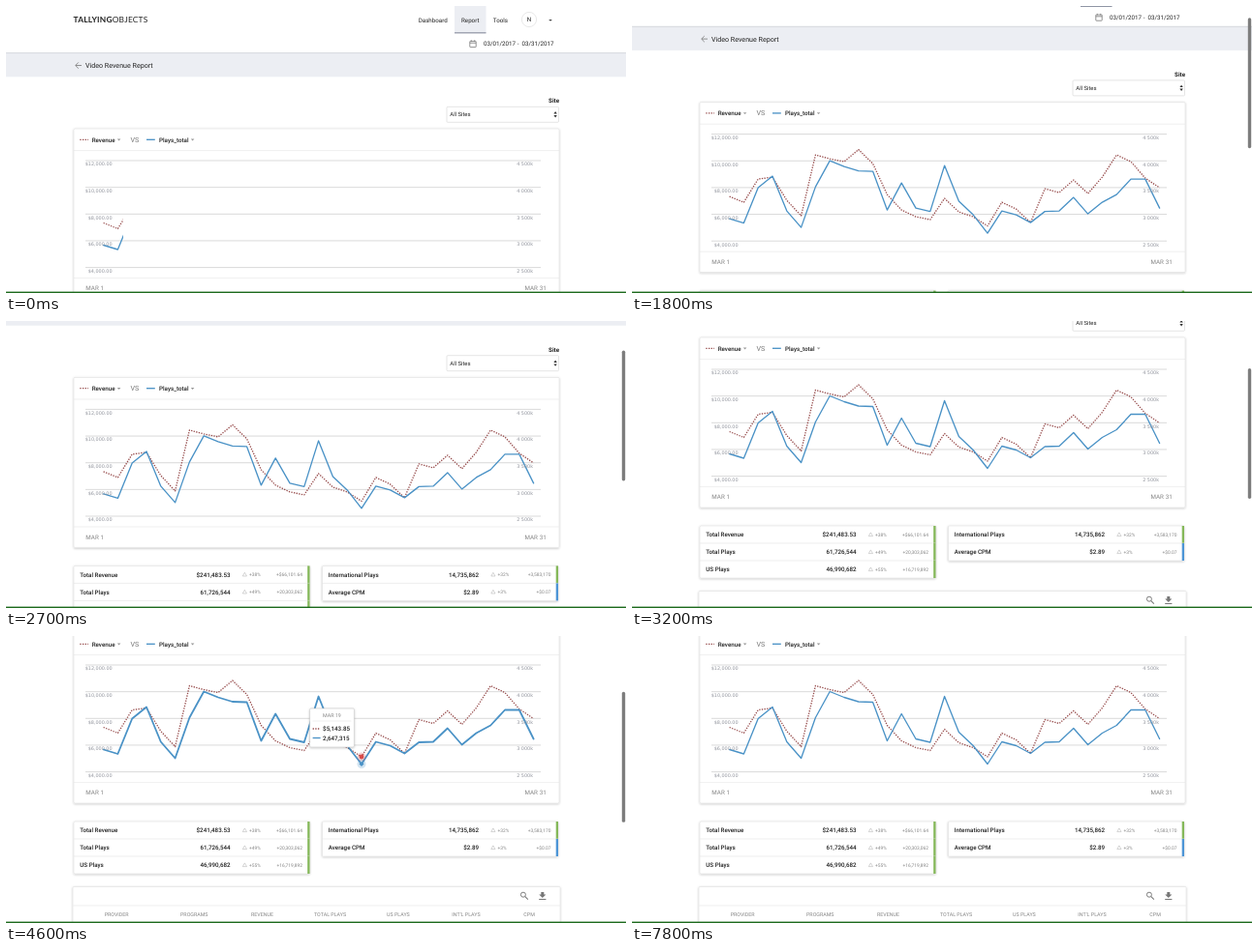
Write an HTML page that moves like this. It is 640 px wide and 297 px high and loops after 8 s.

```html
<!DOCTYPE html>
<html lang="en">
<head>
<meta charset="utf-8">
<title>Video Revenue Report</title>
<style>
  html, body { margin: 0; width: 100%; height: 100%; overflow: hidden; background: #fff; }
  svg { display: block; width: 100%; height: 100%; }
  text { font-family: Roboto, sans-serif; text-rendering: geometricPrecision; white-space: pre; }
  .axis { font-family: "DejaVu Sans", sans-serif; }
  .logo { font-family: Lato, sans-serif; }
</style>
</head>
<body>
<svg id="stage" viewBox="0 0 640 297" xmlns="http://www.w3.org/2000/svg"></svg>
<script>
const LOOP = 8000, STEP = 100;
const PLOT_TOP = 160, GRID_GAP = 27.65, FIRST_X = 100.6, DAY_W = 14.8;
const RED = '#964b4b', BLUE = '#4a92c6', INK = '#222', GREY = '#858585';
const GREEN_BAR = '#85b85a', BLUE_BAR = '#4d95d6';

// Heights of the daily values below the top grid line.
const revenue = [64.5, 70.5, 46.5, 44.5, 68.5, 84.5, 21.5, 25.5, 28.5, 16, 30.5, 62.5, 78.5, 85.5, 88.5, 66.5,
  80.5, 85.5, 95, 70.5, 77.5, 91.5, 56.5, 60.5, 47.5, 61.5, 44.5, 21.5, 28.5, 45.5, 55.5];
const plays = [87.5, 92, 55.5, 43.5, 79.5, 96.5, 54.5, 27.5, 33.5, 38, 38.5, 78.5, 50.5, 76.5, 80, 32.5,
  69.5, 83.5, 102.5, 79.5, 83.5, 91.5, 80, 79.5, 65.5, 82.5, 70.5, 62.5, 46.5, 46.5, 76.5];

const dayX = i => FIRST_X + i * DAY_W;
const points = data => data.map((d, i) => `${dayX(i).toFixed(1)},${PLOT_TOP + d}`).join(' ');

const rect = (x, y, w, h, fill, extra = '') =>
  `<rect x="${x}" y="${y}" width="${w}" height="${h}" fill="${fill}" ${extra}/>`;
const line = (x1, y1, x2, y2, color, w = 0.6, extra = '') =>
  `<line x1="${x1}" y1="${y1}" x2="${x2}" y2="${y2}" stroke="${color}" stroke-width="${w}" ${extra}/>`;
const path = (d, color, w = 0.8) =>
  `<path d="${d}" fill="none" stroke="${color}" stroke-width="${w}"/>`;
// Text is placed by the middle of its capitals.
const text = (x, mid, str, size = 6.22, fill = INK, extra = '') =>
  `<text x="${x}" y="${(mid + size * 0.355).toFixed(2)}" font-size="${size}" fill="${fill}" ${extra}>${str}</text>`;
const MED = 'font-weight="500"', END = 'text-anchor="end"', MID = 'text-anchor="middle"';
const caret = (x, y, color) =>
  `<path d="M${x - 1.8} ${y - 0.9}h3.6l-1.8 1.9z" fill="${color}"/>`;
const card = (x, y, w, h) =>
  rect(x, y, w, h, '#fff', 'rx="1" stroke="#d9d9d9" stroke-width=".5" filter="url(#shade)"');
const dots = (x1, x2, y) => line(x1, y, x2, y, RED, 1.33, 'stroke-dasharray="1.33 1.33"');

function header() {
  return rect(0, 0, 640, 48.5, '#fff', 'filter="url(#shade)"') +
    rect(0, 49, 640, 24.3, '#eceef3') +
    rect(0, 48.2, 640, 0.9, '#d3d6dc') +
    `<text class="logo" x="69.5" y="16.8" font-size="8.4" letter-spacing=".2" fill="#222"><tspan font-weight="700">TALLYING</tspan><tspan font-weight="400">OBJECTS</tspan></text>` +
    text(425.7, 14.6, 'Dashboard') +
    rect(463, 0, 32.5, 28, '#eceef3') + rect(463, 27.2, 32.5, 1.2, '#8f95a5') +
    text(470, 14.6, 'Report') + text(502.8, 14.6, 'Tools') +
    '<circle cx="540" cy="14" r="7.6" fill="#fff" stroke="#d8d8d8" stroke-width=".6"/>' +
    text(540, 14.2, 'N', 6.22, INK, MID) + caret(562, 14.8, '#444') +
    rect(478.8, 36.4, 6.4, 6.2, 'none', 'rx=".5" stroke="#777" stroke-width=".8"') +
    path('M478.8 38.2h6.4M480.3 35.3v1.5M483.7 35.3v1.5', '#777') +
    text(493, 39, '03/01/2017 -  03/31/2017', 6.22) +
    path('M78 61.5h-6M74.8 58.4l-3.1 3.1l3.1 3.1', '#777') +
    text(82, 61.6, 'Video Revenue Report', 7.11);
}

function filters() {
  return text(571, 98, 'Site', 6.22, INK, END + ' font-weight="700"') +
    rect(455, 104.3, 115.5, 16, '#fff', 'rx="1" stroke="#d4d4d4" stroke-width=".6"') +
    text(458.3, 112.2, 'All Sites', 5.92) +
    '<path d="M565.4 111.5h3.4l-1.7-2.4zM565.4 113h3.4l-1.7 2.4z" fill="#333"/>';
}

function chart() {
  let s = card(70, 127, 501, 176) +
    dots(76.3, 85, 138.3) + text(88.7, 138.4, 'Revenue', 6.22, INK, MED) + caret(116.6, 138.5, '#999') +
    text(128.5, 138.3, 'VS', 7.11, '#777') +
    line(145, 138.3, 153.8, 138.3, BLUE, 1.33) +
    text(158, 138.4, 'Plays_total', 6.22, INK, MED) + caret(192.6, 138.5, '#999') +
    line(70, 149.6, 571, 149.6, '#e4e4e4') + line(70, 281.6, 571, 281.6, '#e4e4e4');
  for (let i = 0; i < 5; i++) {
    const y = PLOT_TOP + i * GRID_GAP;
    s += line(82, y, 552, y, '#cbcbcb', 0.7);
  }
  s += `<g clip-path="url(#reveal)" fill="none" stroke-linejoin="round">
    <polyline points="${points(revenue)}" stroke="${RED}" stroke-width="1.33" stroke-dasharray="1.33 1.33"/>
    <polyline id="plays" points="${points(plays)}" stroke="${BLUE}" stroke-linecap="round"/></g>`;
  const left = ['$12,000.00', '$10,000.00', '$8,000.00', '$6,000.00', '$4,000.00'];
  const right = ['4 500k', '4 000k', '3 500k', '3 000k', '2 500k'];
  for (let i = 0; i < 5; i++) {
    const y = PLOT_TOP + i * GRID_GAP + 3.7;
    s += text(i < 2 ? 81.7 : 84.7, y, left[i], 4.89, '#8f929b', 'class="axis"') +
      text(544, y, right[i], 4.89, '#8f929b', 'class="axis" ' + END);
  }
  return s + text(82.2, 292, 'MAR 1', 6.22, GREY, 'letter-spacing=".08"') +
    text(557.8, 292, 'MAR 31', 6.22, GREY, END + ' letter-spacing=".08"');
}

function stats(x, rows) {
  const w = 243.5, rowH = 18;
  let s = card(x, 322, w, rows.length * rowH);
  rows.forEach(([name, value, pct, delta, color], i) => {
    const y = 331 + i * rowH, tx = x + 174.3;
    if (i) s += line(x, y - 9, x + w, y - 9, '#e2e2e2');
    s += text(x + 6.3, y, name, 6.22, INK, MED) +
      text(x + 161.5, y, value, 6.22, INK, MED + ' ' + END) +
      path(`M${tx} ${y + 1.6}h4.2l-2.1-3.7z`, '#aaa', 0.5) +
      text(x + 181, y, pct, 4.89, GREY) +
      text(x + 236, y, delta, 4.89, GREY, END) +
      rect(x + w - 2.3, y - 9, 2.3, rowH, color);
  });
  return s;
}

function table() {
  const columns = [[101.7, 'PROVIDER'], [180, 'PROGRAMS'], [253, 'REVENUE'], [318, 'TOTAL PLAYS'],
    [393, 'US PLAYS'], [460.3, "INT'L PLAYS"], [534.3, 'CPM']];
  return card(69, 389.5, 503, 120) +
    '<circle cx="533.9" cy="397.7" r="2.5" fill="none" stroke="#777" stroke-width=".95"/>' +
    path('M535.8 399.6l3 3', '#777', 1.1) +
    '<path d="M552.3 395h3v2.6h2.1l-3.6 3.4l-3.6-3.4h2.1zM550.2 401.9h7.2v1.1h-7.2z" fill="#777"/>' +
    line(69, 409, 572, 409, '#e4e4e4') +
    columns.map(([x, name]) => text(x, 418, name, 5.33, GREY)).join('');
}

function tooltip() {
  return `<g id="marks">
      <g id="markRed"><circle r="4.5" fill="#dc4a4a" opacity=".25"/><circle r="2.4" fill="#d84b4b"/></g>
      <g id="markBlue"><circle r="4.5" fill="${BLUE}" opacity=".25"/><path d="M0-2.5L2.5 0L0 2.5L-2.5 0z" fill="${BLUE}"/></g>
    </g><g id="tip">` +
    rect(0, 0, 45.8, 40, '#fff', 'rx="1.2" stroke="#bbb" stroke-width=".5" filter="url(#shade)"') +
    text(22.9, 7, '', 5.33, GREY, MID + ' id="tipDay"') +
    line(3, 13, 42.8, 13, '#dcdcdc', 0.5) +
    dots(3, 11, 21) + text(13.5, 21, '', 6.22, INK, MED + ' id="tipRev"') +
    line(3, 30.5, 11, 30.5, BLUE, 1.33) + text(13.5, 30.5, '', 6.22, INK, MED + ' id="tipPlays"') + '</g>';
}

const $ = id => document.getElementById(id);
$('stage').innerHTML = `<defs>
  <filter id="shade" x="-10%" y="-20%" width="120%" height="150%">
    <feDropShadow dx="0" dy=".7" stdDeviation=".9" flood-color="#000" flood-opacity=".25"/></filter>
  <clipPath id="reveal"><rect id="sweep" x="84" y="150" height="131"/></clipPath></defs>
  <g id="page">` + header() + filters() + chart() +
  stats(70, [
    ['Total Revenue', '$241,483.53', '+38%', '+$66,101.64', GREEN_BAR],
    ['Total Plays', '61,726,544', '+49%', '+20,303,062', GREEN_BAR],
    ['US Plays', '46,990,682', '+55%', '+16,719,892', GREEN_BAR]]) +
  stats(326.5, [
    ['International Plays', '14,735,862', '+32%', '+3,583,170', GREEN_BAR],
    ['Average CPM', '$2.89', '+3%', '+$0.07', BLUE_BAR]]) +
  table() + tooltip() + '</g>' +
  rect(635.8, 0, 3.4, 135, '#7d7d7d', 'rx="1.7" id="bar"') +
  rect(0, 295.6, 640, 1.4, '#1c6a1c');

const clamp = v => Math.max(0, Math.min(1, v));
const easeOut = u => 1 - (1 - clamp(u)) ** 3;

// Linear track through [time, value] pairs.
function track(keys, t) {
  const i = keys.findIndex(k => k[0] > t);
  if (i < 0) return keys[keys.length - 1][1];
  if (i === 0) return keys[0][1];
  const [t0, a] = keys[i - 1], [t1, b] = keys[i];
  return a + (b - a) * (t - t0) / (t1 - t0);
}

const scrollKeys = [[1400, 0], [1600, 12], [1800, 27.4], [2100, 45], [2400, 56], [2700, 68.6],
  [3000, 95], [3200, 110], [3400, 120.5], [3700, 128], [4000, 130]];
const days = {
  18: ['MAR 19', '$5,143.85', '2,647,315'],
  19: ['MAR 20', '$6,906.27', '3,066,150']
};

function render(t) {
  const u = clamp(0.18 + 0.82 * t / 1000);
  $('sweep').setAttribute('width', t >= 900 ? 475 : 475 * (0.5 - 0.5 * Math.cos(Math.PI * u)));

  const scroll = track(scrollKeys, t);
  $('page').setAttribute('transform', `translate(0 ${-scroll})`);
  $('bar').setAttribute('y', 0.445 * scroll);
  $('bar').setAttribute('opacity', t < 1500 ? 0 : track([[4600, 1], [4800, 0]], t));

  const hover = t >= 4300 && t < 7200;
  $('plays').setAttribute('stroke-width', hover ? 1.8 : 1.33);
  $('marks').setAttribute('opacity', hover ? 1 : 0);
  $('tip').setAttribute('opacity', t < 4300 ? 0 : track([[7000, 1], [7300, 0]], t));

  const day = t < 5100 ? 18 : 19;
  const [name, rev, count] = days[day];
  $('tipDay').textContent = name;
  $('tipRev').textContent = rev;
  $('tipPlays').textContent = count;
  const across = easeOut((t - 5000) / 500), down = easeOut((t - 5900) / 500);
  $('tip').setAttribute('transform', `translate(${313.6 + 15.8 * across} ${205 + 9 * across + 18 * down})`);
  $('markRed').setAttribute('transform', `translate(${dayX(day)} ${PLOT_TOP + revenue[day]})`);
  $('markBlue').setAttribute('transform', `translate(${dayX(day)} ${PLOT_TOP + plays[day]})`);
}

const start = performance.now();
function tick() {
  const t = (performance.now() - start) % LOOP;
  render(Math.floor(t / STEP) * STEP);
  requestAnimationFrame(tick);
}
tick();
</script>
</body>
</html>
```
